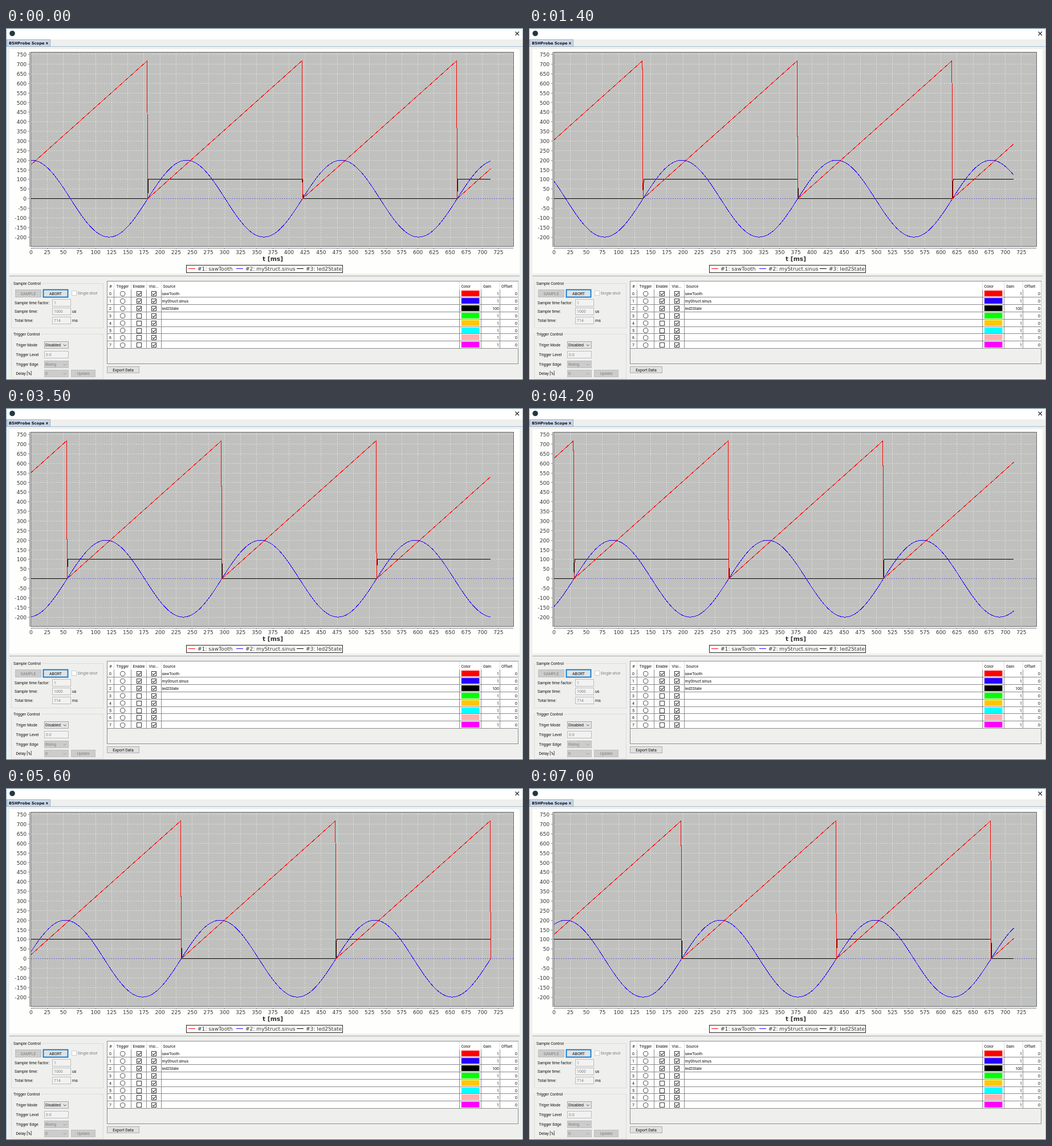
An HTML page for the animation above (7700 ms loop, 907 by 618 pixels).

```html
<!DOCTYPE html>
<html lang="en">
<head>
<meta charset="utf-8">
<title>Scope</title>
<style>
  html, body { margin: 0; width: 100%; height: 100%; overflow: hidden; background: #eff0ed; }
  svg { display: block; width: 907px; height: 618px; }
  text { font: 7px Roboto, "Liberation Sans", sans-serif; fill: #111; white-space: pre; }
  .chart { font: 9.1px "DejaVu Sans", sans-serif; fill: #333; }
  .axis { font: bold 10.7px "DejaVu Sans", sans-serif; fill: #333; }
  .tab { font: bold 6.7px "DejaVu Sans", sans-serif; }
  .off { fill: #808080; }
  .wave { fill: none; stroke-width: 1; shape-rendering: crispEdges; }
</style>
</head>
<body>
<svg id="stage" viewBox="0 0 907 618" xmlns="http://www.w3.org/2000/svg"></svg>
<script>
const stage = document.getElementById('stage');

function add(tag, attrs, content) {
  const node = document.createElementNS(stage.namespaceURI, tag);
  for (const key in attrs) node.setAttribute(key, attrs[key]);
  if (content !== undefined) node.textContent = content;
  return stage.appendChild(node);
}
const fill = (x, y, w, h, color) => add('rect', { x, y, width: w, height: h, fill: color });
const box = (x, y, w, h, color, stroke, width = 1) =>
  add('rect', { x: x + .5, y: y + .5, width: w, height: h, fill: color, stroke, 'stroke-width': width });
const line = (x1, y1, x2, y2, stroke, more) => add('line', { x1, y1, x2, y2, stroke, ...more });
const path = (d, stroke, width = 1) => add('path', { d, fill: 'none', stroke, 'stroke-width': width });
const label = (x, y, str, cls = '', anchor = 'start') =>
  add('text', { x, y, class: cls, 'text-anchor': anchor }, str);
const snap = v => Math.floor(v) + .5;

// Chart coordinates
const px = t => 44 + t * 1.131;
const py = v => 299.6 - v * .3373;
const LEFT = 44, RIGHT = 890, TOP = 42, BOTTOM = 384;
const RED = '#ff0000', BLUE = '#2800ff', BLACK = '#000000', PANEL = '#eff0ed';

function drawWindow() {
  fill(0, 0, 907, 618, PANEL);
  fill(0, 0, 907, 20, '#ffffff');
  line(0, .5, 907, .5, '#3f6177');
  line(.5, 0, .5, 618, '#7fa6c4');
  line(906.5, 0, 906.5, 618, '#a9b4bb');
  line(0, 617.5, 907, 617.5, '#45606f');
  add('circle', { cx: 11, cy: 9.5, r: 4.8, fill: '#24373f' });
  path('M893.5 6.5l6.5 6.5m0 -6.5l-6.5 6.5', '#222', 1.1);
  line(1, 32.5, 906, 32.5, '#a3bdd6');
  box(1, 20, 76, 12, '#cbd9ea', '#9aa9bc');
  label(5, 29, 'B5HProbe Scope', 'tab');
  path('M70.2 24.8l3.4 3.8m0 -3.8l-3.4 3.8', '#222', 1.1);
}

function drawChart() {
  fill(6, 37, 895, 394, '#fefffd');
  fill(LEFT, TOP, RIGHT - LEFT, BOTTOM - TOP, '#c0c1be');
  const grid = { 'stroke-dasharray': '2 2', 'stroke-width': 1, 'stroke-opacity': .5 };
  for (let t = 0; t <= 725; t += 25) {
    const x = snap(px(t));
    if (t) line(x, TOP, x, BOTTOM, '#fff', grid);
    line(x, 386, x, 388, '#808080');
    label(px(t), 396.5, t, 'chart', 'middle');
  }
  for (let v = -200; v <= 750; v += 50) {
    const y = snap(py(v));
    line(LEFT, y, RIGHT, y, '#fff', grid);
    line(39, y, 41, y, '#808080');
    label(36, py(v) + 3.6, v, 'chart', 'end');
  }
  line(41.5, TOP, 41.5, BOTTOM, '#808080');
  line(LEFT, 386.5, RIGHT, 386.5, '#808080');
  line(LEFT, snap(py(0)), RIGHT, snap(py(0)), '#5a5ac8', { 'stroke-dasharray': '2 2', 'stroke-width': .9 });
  box(43, TOP, 847, 341, 'none', '#62666c');
  label(468, 408.5, 't [ms]', 'axis', 'middle');

  box(316, 416, 274, 13, '#ffffff', '#222');
  [[320, RED, '#1: sawTooth'], [404, BLUE, '#2: myStruct.sinus'], [510, BLACK, '#3: led2State']]
    .forEach(([x, color, name]) => {
      line(x, 422.5, x + 12, 422.5, color);
      label(x + 16, 426.3, name, 'chart');
    });
}

function group(y, h, title, w) {
  box(9, y, 161, h, 'none', '#dcdcdc');
  fill(11, y - 2, w, 5, PANEL);
  label(13, y + 3, title);
}
function button(x, y, w, h, name, { off = false, focus = false } = {}) {
  const edge = focus ? '#0078d7' : off ? '#bfbfbf' : '#adadad';
  box(x, y, w, h, off ? '#cccccc' : '#e1e1e1', edge, focus ? 1.8 : 1);
  label(x + w / 2 + .5, y + h / 2 + 3, name, off ? 'off' : '', 'middle');
}
function field(x, y, w, value) {
  box(x, y, w, 12, '#f2f2f2', '#bcbcbc');
  label(x + 3, y + 9, value, 'off');
}
function combo(y, value, off) {
  box(67, y, 42, 12, off ? '#cccccc' : '#e3e3e3', off ? '#bfbfbf' : '#a8a8a8');
  label(69, y + 9, value, off ? 'off' : '');
  path(`M101 ${y + 5.8}l2.3 2.3l2.3 -2.3`, off ? '#999' : '#333', .9);
}

function drawControls() {
  line(6, 435.5, 901, 435.5, '#a8a8a8');
  group(448, 78, 'Sample Control', 52);
  button(16, 459, 45, 13, 'SAMPLE', { off: true });
  button(65, 459, 43, 13, 'ABORT', { focus: true });
  box(115, 461, 8, 8, '#ffffff', '#cccccc');
  label(125.5, 468, 'Single-shot', 'off');
  [['Sample time factor:', '1', ''], ['Sample time:', '1000', 'us'], ['Total time:', '714', 'ms']]
    .forEach(([name, value, unit], i) => {
      const y = Math.floor(476 + i * 15.5);
      label(15, y + 9, name);
      field(81, y, 32, value);
      label(116, y + 9, unit);
    });

  group(537, 78, 'Trigger Control', 51);
  ['Triger Mode', 'Trigger Level', 'Trigger Edge', 'Delay [%]']
    .forEach((name, i) => label(17.5, 559 + i * 16.8, name));
  combo(550, 'Disabled');
  field(67, 567, 42, '0.0');
  combo(584, 'Rising', true);
  combo(600, '0', true);
  button(114, 600, 42, 12, 'Update', { off: true });
}

function checkbox(x, y, on) {
  box(x, y, 8, 8, '#ffffff', '#333');
  if (on) path(`M${x + 2} ${y + 4.5}l2 2.2l3.6 -4.2`, '#222', 1.1);
}

function drawTable() {
  const rowH = 12.9, top = 459.5, edge = '#8a8a8a';
  box(177, 444, 721, 145, PANEL, '#888e95');
  fill(178, 445, 720.5, 118, '#ffffff');
  [['#', 183.5, 'middle'], ['Trigger', 204.5, 'middle'], ['Enable', 233, 'middle'], ['Visi...', 259, 'middle'],
   ['Source', 275.5], ['Color', 798.5], ['Gain', 837], ['Offset', 869]]
    .forEach(([name, x, anchor]) => label(x, 455.5, name, '', anchor));
  for (const x of [189.5, 219.5, 246.5, 272.5, 795.5, 833.5, 866.5]) {
    line(x, 445, x, top, '#dedede');
    line(x, top, x, 563, edge);
  }
  const names = ['sawTooth', 'myStruct.sinus', 'led2State'];
  const colors = [RED, BLUE, BLACK, '#00ff00', '#ffc800', '#00ffff', '#ffafaf', '#ff00ff'];
  colors.forEach((color, i) => {
    const y = top + i * rowH, mid = y + 7, base = mid + 2.5;
    const bottom = snap(y + rowH);
    line(178, bottom, 898, bottom, edge);
    label(183, base, i, '', 'middle');
    add('circle', { cx: 204.7, cy: mid, r: 4.1, fill: '#fff', stroke: '#333', 'stroke-width': .9 });
    checkbox(229, Math.round(mid - 4.5), i < 3);
    checkbox(255, Math.round(mid - 4.5), true);
    label(273.5, base, names[i] || '');
    fill(799, Math.round(y + 1.5), 31.5, 10, color);
    label(865, base, i === 2 ? 100 : 1, '', 'end');
    label(897, base, 0, '', 'end');
  });
  button(177, 594, 56, 11, 'Export Data');
}

drawWindow();
drawChart();
drawControls();
drawTable();

// Signals: 714 samples, one per millisecond; `start` is where the LED period begins
const PERIOD = 240, SAMPLES = 714, STEP = 700;
const starts = [181, 160, 138, 110, 81, 56, 31, 5, -7, 221, -42];
const mod = (a, n) => ((a % n) + n) % n;
const signals = [
  [BLACK, k => mod(k - 1, 2 * PERIOD) < PERIOD ? 100 : 0],
  [BLUE, k => 200 * Math.sin(2 * Math.PI * k / PERIOD)],
  [RED, k => 3 * mod(k, PERIOD)]
].map(([stroke, value]) => ({ value, node: add('polyline', { class: 'wave', stroke }) }));

function drawSignals(start) {
  for (const { value, node } of signals) {
    const points = Array.from({ length: SAMPLES }, (_, t) =>
      px(t).toFixed(2) + ',' + py(value(t - start)).toFixed(2));
    node.setAttribute('points', points.join(' '));
  }
}

const began = performance.now();
let shown = -1;
function tick() {
  const index = Math.floor((performance.now() - began) / STEP) % starts.length;
  if (index !== shown) drawSignals(starts[shown = index]);
  requestAnimationFrame(tick);
}
tick();
</script>
</body>
</html>
```
